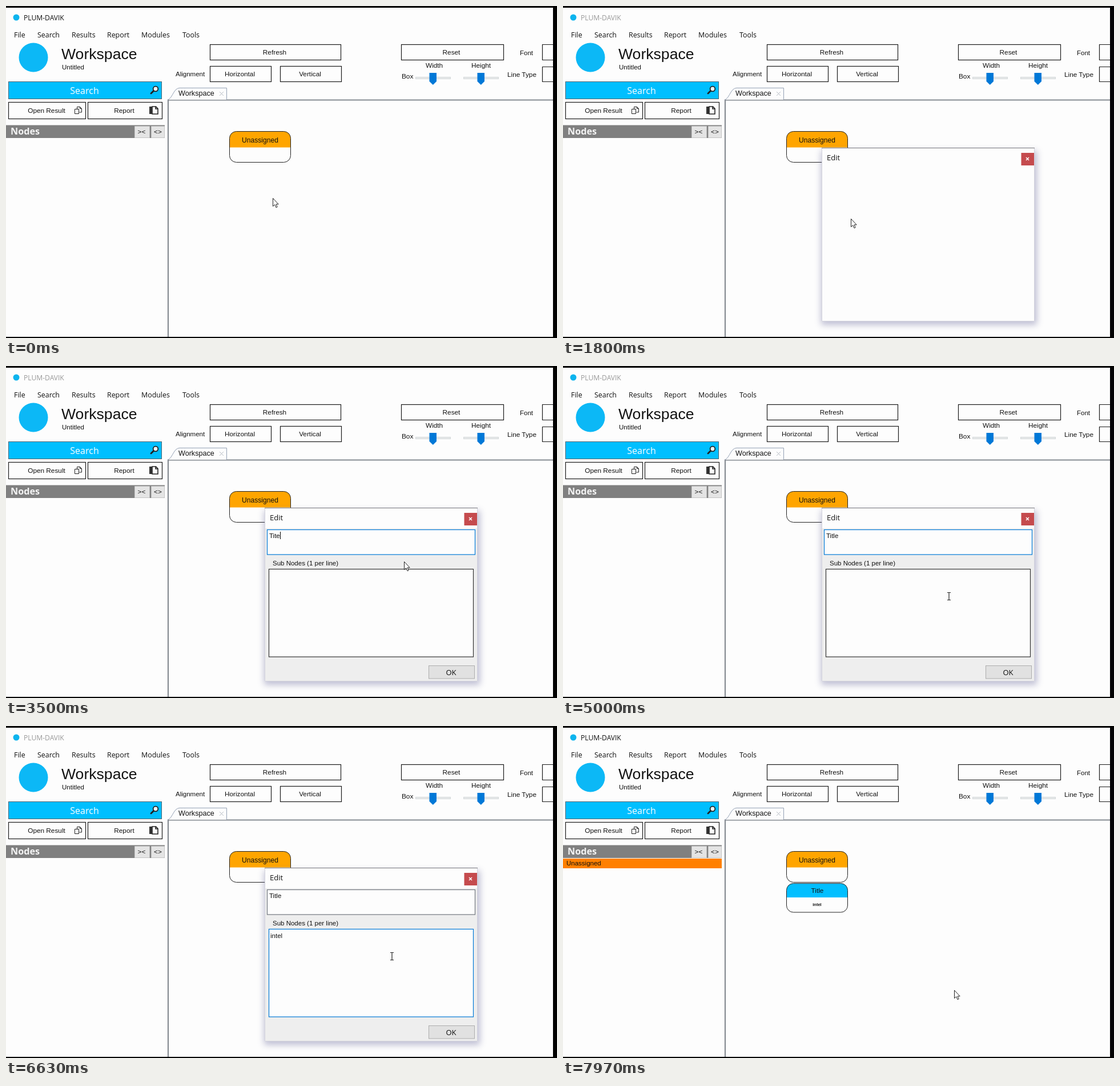
Animation, 965 px wide and 581 px high, one loop 8 s. Source, as an HTML page:

```html
<!DOCTYPE html>
<html lang="en">
<head>
<meta charset="utf-8">
<title>Workspace</title>
<style>
  html, body { margin: 0; width: 100%; height: 100%; overflow: hidden; background: #000; }
  svg { display: block; width: 100%; height: 100%; }
  text { font: 11.8px "Liberation Sans", Arial, sans-serif; fill: #111; white-space: pre; }
  .mid { text-anchor: middle; }
  .small { font-size: 11.5px; }
  .ui { font: 12.4px "Open Sans", "Noto Sans", sans-serif; }
  .caption { font: 13px "Open Sans", "Noto Sans", sans-serif; }
  .heading { font: bold 16.2px "Noto Sans", sans-serif; fill: #f4f4f4; }
  .box { fill: #fdfdfd; stroke: #1c1c1c; stroke-width: 1.2; }
  .line { fill: none; stroke: #222; }
</style>
</head>
<body>
<svg viewBox="0 0 965 581" xmlns="http://www.w3.org/2000/svg">
  <defs>
    <filter id="shadow" x="-10%" y="-10%" width="120%" height="120%">
      <feGaussianBlur stdDeviation="6"/>
    </filter>
    <g id="slider">
      <rect x=".5" y="7.5" width="61" height="3" fill="#e7eaea" stroke="#d4d8da"/>
      <path d="M24.5 0h12.5v15l-6.2 6-6.3-6z" fill="#0078d7"/>
    </g>
  </defs>

  <rect width="965" height="581" fill="#000"/>
  <rect y="3" width="958" height="576" fill="#fdfdfd"/>

  <!-- title bar and menu -->
  <circle cx="18" cy="20" r="5.5" fill="#0cb4ee"/>
  <text id="appName" class="ui" x="31" y="24.5" style="font-size:12.1px">PLUM-DAVIK</text>
  <g id="menuBar"></g>

  <!-- header -->
  <circle cx="48" cy="90" r="25.5" fill="#0cb8f6"/>
  <text x="97" y="93" style="font-size:26.6px">Workspace</text>
  <text x="98" y="111" class="small">Untitled</text>
  <text x="297" y="123" class="small">Alignment</text>
  <text x="693" y="127">Box</text>
  <text x="735" y="108">Width</text>
  <text x="815" y="108">Height</text>
  <text x="900" y="85.5" class="small">Font</text>
  <text x="878" y="124">Line Type</text>
  <path class="box" d="M958 67.5h-18.5v27h18.5M958 106.5h-18.5v26h18.5"/>
  <g id="buttons"></g>
  <use href="#slider" x="717" y="117"/>
  <use href="#slider" x="801" y="117"/>

  <!-- side panel -->
  <rect x="4.5" y="132.5" width="268" height="30" fill="#00bfff" stroke="#4a6470"/>
  <text class="caption mid" x="137.5" y="154" style="font-size:16.1px;fill:#fff">Search</text>
  <path d="M259 148l-5 5" stroke="#222" stroke-width="2.8" stroke-linecap="round"/>
  <circle cx="262" cy="145" r="4.3" fill="#eafaff" stroke="#222" stroke-width="1.8"/>
  <path class="line" d="M120.5 180.5h7v8h-7zM124.5 180v-3.5h5l3 3v6.5h-4M129.5 176.5v3h3"/>
  <path d="M251 176h8v13h-8z" fill="#333"/>
  <path class="line" stroke-width="1.6" style="fill:#fdfdfd" d="M256 176h6.5l3.500 3.500V189H256zM262 176v4h4"/>
  <rect y="208.5" width="278" height="22.5" fill="#808080"/>
  <text class="heading" x="8" y="224.5">Nodes</text>
  <path d="M225.5 210.5h26v20h-26zM254.5 210.5h23v20h-23z" fill="#e4e4e4" stroke="#c4c4c4"/>
  <text class="mid" x="237.5" y="224">&gt;&lt;</text>
  <text class="mid" x="266" y="224">&lt;&gt;</text>
  <g id="treeRow">
    <rect y="232" width="278" height="17" fill="#ff8000"/>
    <text x="6" y="244" class="small">Unassigned</text>
  </g>

  <!-- workspace tab -->
  <path d="M284 579V164.5H958" fill="none" stroke="#868b92" stroke-width="2.2"/>
  <path d="M284 164C292 160 294 143.5 304 143.5H386.500V164" fill="#fdfdfd" stroke="#93a0b4"/>
  <text x="302" y="157" style="font-size:12.6px">Workspace</text>
  <path d="M374 150l7 7m0-7l-7 7" stroke="#b4bac2"/>

  <g id="firstNode">
    <path d="M391.5 247.5V231.5a12 12 0 0 1 12-12h83a12 12 0 0 1 12 12V247.5z" fill="#ffa500"/>
    <rect class="line" x="391.5" y="219.5" width="107" height="54" rx="12"/>
    <text class="mid" x="445" y="239" style="font-size:12.1px">Unassigned</text>
  </g>
  <g id="newNode">
    <path d="M391.5 300V287.5a12 12 0 0 1 12-12h83a12 12 0 0 1 12 12V300z" fill="#00bfff"/>
    <rect class="line" x="391.5" y="275.5" width="107" height="50.5" rx="12"/>
    <text class="mid" x="445.5" y="292">Title</text>
    <text class="mid" x="445" y="315" style="font-size:7.5px;font-weight:bold">intel</text>
  </g>

  <g id="popup">
    <rect x="470" y="341" width="205" height="57" fill="#000" opacity=".18"/>
    <rect x="467.5" y="337.5" width="204" height="56" fill="#f4f4f4" stroke="#b8b8b8"/>
    <rect id="hover" x="470" width="200" height="26" fill="#b5d7f3"/>
    <text class="ui" x="500" y="357">Refresh</text>
    <text class="ui" x="500" y="383">New Node</text>
  </g>

  <g id="dialog">
    <rect x="452" y="253" width="378" height="305" fill="#68689a" opacity=".42" filter="url(#shadow)"/>
    <rect x="453" y="248" width="373" height="304" fill="#fdfdfd"/>
    <path d="M453 248.5H826" stroke="#77777c"/>
    <path d="M453.5 249V551.5H825.500V249" fill="none" stroke="#d2d2dc"/>
    <text class="caption" x="462" y="270">Edit</text>
    <rect x="802.5" y="257" width="22.5" height="22" fill="#c54b4e"/>
    <path d="M811 265l5 5m0-5l-5 5" stroke="#fff" stroke-width="1.5"/>
    <g id="form">
      <rect x="454" y="284" width="371" height="267" fill="#eeeeee"/>
      <rect id="titleBox" x="457.5" y="286.5" width="364" height="43.5" fill="#fdfdfd" stroke-width="1.2"/>
      <text x="467" y="349" class="small">Sub Nodes (1 per line)</text>
      <rect id="subBox" x="460.5" y="355.5" width="358" height="153.5" fill="#fdfdfd" stroke-width="1.2"/>
      <text id="titleText" x="461" y="300.5" class="small"></text>
      <text id="subText" x="463" y="370.5" class="small"></text>
      <path id="caret" d="M0 0v13" stroke="#000"/>
      <rect id="okButton" x="740.5" y="524.5" width="80" height="22.5"/>
      <text class="caption mid" x="779.5" y="541">OK</text>
    </g>
  </g>

  <path id="pointer" d="M.5 .5V14.5L3.8 11.6 6 16.7 8.2 15.7 6 10.9H10.2z" fill="#fff" stroke="#222"/>
  <path id="beam" d="M-3 -6.5h2.5l.5 .5 .5-.5h2.5M0 -6V6M-3 6.5h2.5l.5-.5 .5 .5h2.5" fill="none" stroke="#222" stroke-width="1.2"/>
</svg>

<script>
const LOOP = 8000, BLINK = 530;
const OPEN = 1800, FORM = 1870, FOCUS_SUB = 5170, CLOSE = 7470, RESULT = 7600;
const $ = id => document.getElementById(id);

$('menuBar').innerHTML = [['File', 14], ['Search', 55], ['Results', 115], ['Report', 177], ['Modules', 237], ['Tools', 309]]
  .map(([label, x]) => `<text class="ui" x="${x}" y="55">${label}</text>`).join('');

// label, left, top, width, height, label centre
$('buttons').innerHTML = [
  ['Refresh', 357, 67, 229, 27, 470.5], ['Horizontal', 357, 105, 107, 27, 409.5],
  ['Vertical', 480, 105, 107, 27, 532.5], ['Reset', 692, 67, 179, 27, 780],
  ['Open Result', 4, 168, 135, 29, 71], ['Report', 143, 168, 130, 29, 207]
].map(([label, x, y, w, h, mid]) =>
  `<rect class="box" x="${x + .5}" y="${y + .5}" width="${w}" height="${h}"/>` +
  `<text class="mid" x="${mid}" y="${y + h / 2 + 4.5}">${label}</text>`).join('');

// time, x, y
const path = [
  [1130, 467, 336], [1230, 462, 350], [1430, 504, 372],
  [2330, 504, 372], [2490, 697, 342], [4700, 697, 342], [4980, 676, 403],
  [6630, 676, 403], [7260, 772, 525], [7900, 772, 525], [7970, 685, 462]
];
const titleKeys = [[3230, 'T'], [3330, 'Ti'], [3430, 'Tit'], [3500, 'Tite'], [3900, 'Tit'], [4070, 'Titl'], [4170, 'Title']];
const subKeys = [[5770, 'i'], [5870, 'in'], [5930, 'int'], [6030, 'inte'], [6100, 'intel']];

const clamp = v => Math.max(0, Math.min(1, v));
const ramp = (t, start, length) => clamp((t - start) / length);
const ease = v => v * v * (3 - 2 * v);
const show = (id, on) => $(id).style.display = on ? '' : 'none';
const mix = (a, b, k) => `rgb(${a.map((v, i) => Math.round(v + (b[i] - v) * k))})`;
const inside = (p, x, y, w, h) => p.x >= x && p.x <= x + w && p.y >= y && p.y <= y + h;
const typed = (keys, t) => keys.reduce((last, key) => key[0] <= t ? key : last, [0, '']);

function cursorAt(t) {
  const i = path.findIndex(p => p[0] > t);
  if (i === 0) return { x: path[0][1], y: path[0][2] };
  if (i < 0) return { x: path.at(-1)[1], y: path.at(-1)[2] };
  const [t0, x0, y0] = path[i - 1], [t1, x1, y1] = path[i];
  const k = ease((t - t0) / (t1 - t0));
  return { x: Math.round(x0 + (x1 - x0) * k), y: Math.round(y0 + (y1 - y0) * k) };
}

function drawForm(t, cursor) {
  const focus = ramp(t, FOCUS_SUB, 230);
  const blue = [0, 120, 215], grey = [112, 118, 126], dark = [50, 50, 50];
  $('titleBox').setAttribute('stroke', mix(blue, grey, focus));
  $('subBox').setAttribute('stroke', mix(dark, blue, focus));

  const title = typed(titleKeys, t), sub = typed(subKeys, t);
  $('titleText').textContent = title[1];
  $('subText').textContent = sub[1];

  const inSub = t >= FOCUS_SUB;
  const field = $(inSub ? 'subText' : 'titleText');
  const since = Math.max(inSub ? FOCUS_SUB : OPEN, (inSub ? sub : title)[0]);
  const x = Math.round(+field.getAttribute('x') + field.getComputedTextLength()) + .5;
  $('caret').setAttribute('transform', `translate(${x} ${inSub ? 360 : 290})`);
  show('caret', Math.floor((t - since) / BLINK) % 2 === 0);

  const hot = inside(cursor, 740, 524, 81, 23) ? ramp(t, 7230, 150) : 0;
  $('okButton').setAttribute('fill', mix([225, 225, 225], [229, 241, 251], hot));
  $('okButton').setAttribute('stroke', mix([173, 173, 173], blue, hot));
}

function draw(t) {
  const cursor = cursorAt(t);
  const formOpen = t >= FORM && t < CLOSE;
  const dialogOpen = t >= OPEN && t < RESULT;

  $('appName').style.fill = t >= OPEN && t < CLOSE ? '#999' : '#111';
  show('treeRow', t >= RESULT);
  show('newNode', t >= RESULT);

  show('popup', t >= 830 && t < OPEN);
  $('popup').style.opacity = t < 870 ? .6 : 1;
  $('hover').setAttribute('y', cursor.y >= 366 ? 366 : 339);
  show('hover', inside(cursor, 468, 339, 203, 54));

  show('dialog', dialogOpen);
  $('dialog').style.opacity = 1 - ramp(t, CLOSE, RESULT - CLOSE);
  show('form', t >= FORM);
  if (dialogOpen && t >= FORM) drawForm(t, cursor);

  const overText = formOpen && (inside(cursor, 457, 286, 365, 44) || inside(cursor, 460, 355, 358, 154));
  show('beam', overText);
  show('pointer', !overText);
  $(overText ? 'beam' : 'pointer').setAttribute('transform', `translate(${cursor.x} ${cursor.y})`);
}

function tick() {
  draw(performance.now() % LOOP);
  requestAnimationFrame(tick);
}
tick();
</script>
</body>
</html>
```
